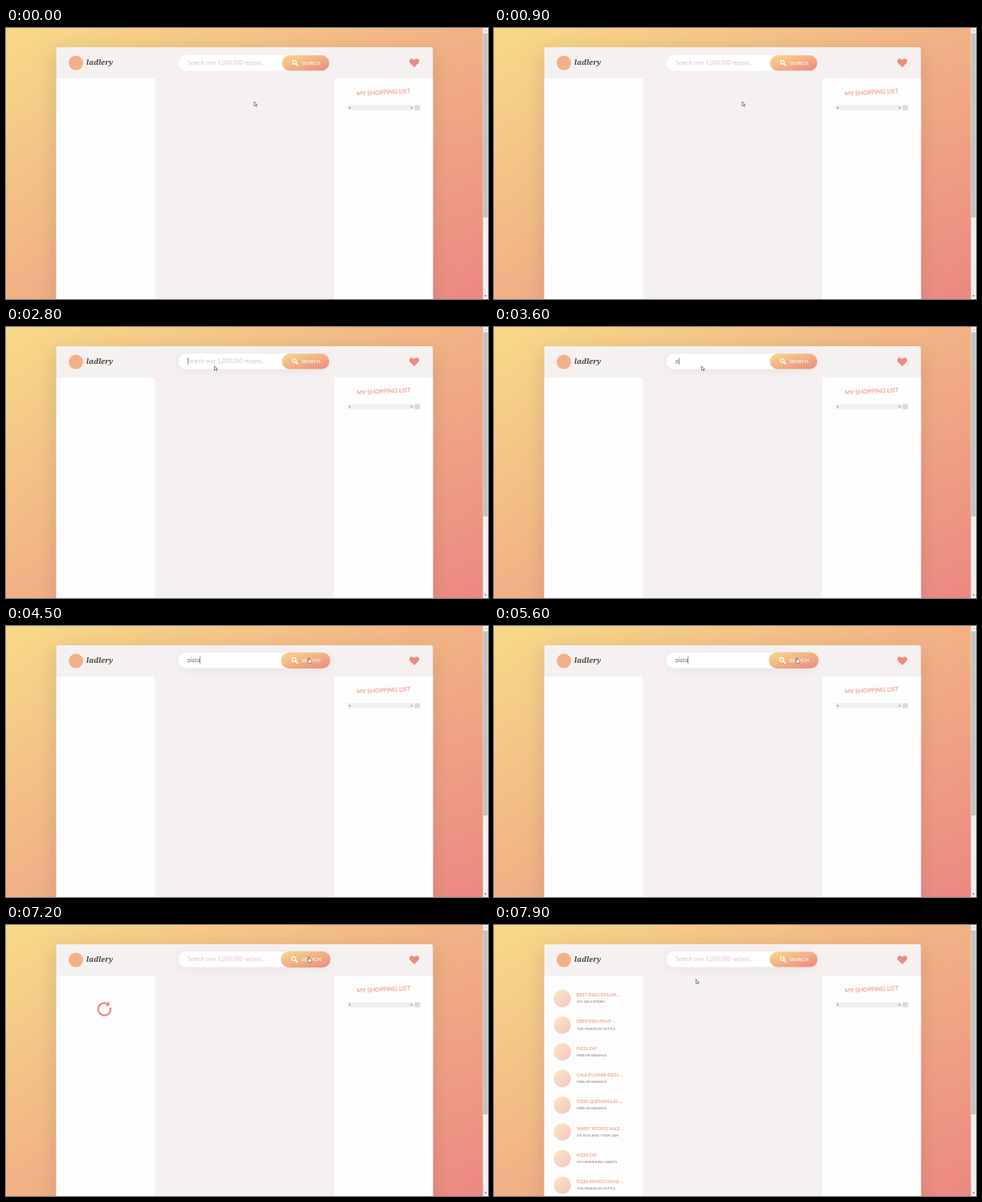
Recreate the animation shown at these times as an HTML page. Size 600x338 px, loop 8000 ms.

```html
<!DOCTYPE html>
<html lang="en">
<head>
<meta charset="utf-8">
<title>Recipe search</title>
<style>
  html, body { margin: 0; width: 100%; height: 100%; overflow: hidden; }
  svg { display: block; width: 600px; height: 338px; }
  text { font-family: Lato, "Open Sans", sans-serif; white-space: pre; }
  .brand { font: italic 700 9px "Noto Serif", serif; fill: #4a3f3c; }
  .hint { font-size: 6.93px; fill: #d0c6c3; }
  .typed { font-size: 6.93px; fill: #6b605c; }
  .label { font-size: 6px; font-weight: 500; fill: #fff; }
  .heading { font-size: 7.4px; font-weight: 500; fill: #ee8f80; }
  .title { font-size: 5.3px; font-weight: 500; fill: #ee8f80; }
  .author { font-size: 4.5px; fill: #877b77; }
</style>
</head>
<body>
<svg viewBox="0 0 600 338">
  <defs>
    <linearGradient id="warm" x1="0" y1="0" x2="1" y2="1">
      <stop offset="0" stop-color="#f7da88"/>
      <stop offset="1" stop-color="#ec8882"/>
    </linearGradient>
    <filter id="pageBlur"><feGaussianBlur stdDeviation="11.7"/></filter>
    <filter id="fieldBlur" y="-150%" height="400%"><feGaussianBlur stdDeviation="5.8"/></filter>
  </defs>

  <rect width="594" height="338" fill="url(#warm)"/>

  <!-- page scrollbar -->
  <rect x="593.7" width="6.3" height="338" fill="#f1f1f1"/>
  <rect x="594.2" y="6.6" width="5.3" height="229.6" fill="#c1c1c1"/>
  <path d="M595.5 4h2.8l-1.4-1.6z" fill="#a3a3a3"/>
  <path d="M595.5 333.6h2.8l-1.4 1.6z" fill="#505050"/>

  <!-- card -->
  <rect x="60.6" y="30" width="472.8" height="434" fill="#655a56" opacity=".2" filter="url(#pageBlur)"/>
  <rect x="62.6" y="24" width="468.8" height="430" rx="2.3" fill="#f5f1f0"/>
  <rect x="62.6" y="63" width="122.8" height="390" fill="#fefdfd"/>
  <rect x="408.6" y="63" width="122.8" height="390" fill="#fefdfd"/>

  <circle cx="87" cy="43.6" r="9" fill="#f2b088"/>
  <text class="brand" x="100" y="46.2">ladlery</text>
  <path d="M508.2 49.1L503 43.8C501 41.5 502.2 38.3 504.9 38.2C506.5 38.2 507.6 39.1 508.2 40.3C508.8 39.1 509.9 38.2 511.5 38.2C514.2 38.3 515.4 41.5 513.4 43.8Z" fill="#ee8b80"/>

  <!-- search form -->
  <g id="form">
    <rect id="glow" x="214.7" y="36.8" width="187.8" height="19.2" rx="9.6" fill="#655a56" filter="url(#fieldBlur)"/>
    <rect x="214.7" y="34.1" width="187.8" height="19.2" rx="9.6" fill="#fff"/>
    <text class="hint" id="hint" x="226" y="45.9">Search over 1,000,000 recipes...</text>
    <text class="typed" id="typed" x="226" y="45.9"></text>
    <rect id="caret" y="39.2" width=".7" height="8.6" fill="#6b605c"/>
    <g id="button">
      <rect x="343.5" y="34.1" width="59" height="19.2" rx="9.6" fill="url(#warm)"/>
      <g fill="none" stroke="#fff">
        <circle cx="359" cy="42.8" r="2.3" stroke-width="1.1"/>
        <path d="M360.8 44.6L363.2 47" stroke-width="1.5" stroke-linecap="round"/>
      </g>
      <text class="label" x="368" y="45.8">SEARCH</text>
    </g>
  </g>

  <!-- shopping list -->
  <g transform="translate(470 80) skewY(-3)">
    <text class="heading" y="2.8" text-anchor="middle">MY SHOPPING LIST</text>
  </g>
  <rect x="424.3" y="96.2" width="84.4" height="6.4" fill="#f0f0f0"/>
  <rect x="508.7" y="96.2" width="6.5" height="6.4" fill="#dadada"/>
  <path d="M428.5 98v2.8l-1.6-1.4zM504.4 98v2.8l1.6-1.4z" fill="#606060"/>

  <!-- results column -->
  <g id="loader">
    <path id="ring" fill="none" stroke="#ee8b80" stroke-width="2.1"/>
    <path d="M3.4 -.1H10.5L6.95 3.9Z" fill="#ee8b80"/>
  </g>
  <g id="results"></g>

  <path id="arrow" d="M0 0V5.3L1.3 4.2L2.2 6L3 5.6L2.2 3.9H3.8Z" fill="#fff" stroke="#3a3636" stroke-width=".6" stroke-linejoin="round"/>
  <path id="hand" d="M-.6 .5Q0 -.4 .6 .5V2.4L3.2 3Q3.9 3.3 3.8 4.2L3.2 6.8H-.1L-2 4.2Q-1.7 3.3 -.6 4.2Z" fill="#fff" stroke="#3a3636" stroke-width=".55" stroke-linejoin="round"/>
</svg>

<script>
  const LOOP = 8000;
  const FOCUS = 2450, ENTER = 4365, SUBMIT = 6050, LOADED = 7400, LEAVE = 7755;
  const FADE = 200;

  const $ = id => document.getElementById(id);
  const clamp = v => Math.min(1, Math.max(0, v));
  const smooth = v => v * v * (3 - 2 * v);
  const since = (t, start) => smooth(clamp((t - start) / FADE));
  const show = (el, on) => el.setAttribute('visibility', on ? 'visible' : 'hidden');
  const move = (el, value) => el.setAttribute('transform', value);

  // time, x, y of the pointer
  const pointer = [
    [0, 309, 92], [1250, 309, 92], [1600, 306.5, 89], [1900, 300, 81.2],
    [2500, 259.5, 48.7], [2900, 259.5, 48.7], [3300, 258.5, 48.7], [4150, 258.5, 48.7],
    [4480, 377, 39.6], [7680, 377, 39.6], [7900, 251.5, 67.7], [8000, 249.5, 68.5]
  ];
  const keys = [[3520, 'p'], [3780, 'pi'], [3950, 'piz'], [4100, 'pizz'], [4300, 'pizza'], [SUBMIT, '']];
  const recipes = [
    ['BEST PIZZA DOUGH ...', '205 SAUCEPANS'],
    ['DEEP DISH FRUIT ...', 'THE MEADOW KETTLE'],
    ['PIZZA DIP', 'PARLOR BAKINGS'],
    ['CAULIFLOWER PIZZA ...', 'PARLOR BAKINGS'],
    ['PIZZA QUESADILLAS ...', 'PARLOR BAKINGS'],
    ['SWEET POTATO KALE ...', 'SIX FIGS AND THEIR JAM'],
    ['PIZZA DIP', 'MY SIMMERING HABITS'],
    ['PIZZA POTATO SKINS ...', 'THE MEADOW KETTLE']
  ];

  $('results').innerHTML = recipes.map(([title, author], i) => `
    <g transform="translate(0 ${i * 33.27})">
      <circle cx="85" cy="91.6" r="10.8" fill="url(#warm)" opacity=".5"/>
      <text class="title" x="103" y="89.2">${title}</text>
      <text class="author" x="103" y="97.4">${author}</text>
    </g>`).join('');

  const polar = (r, deg) => {
    const a = deg * Math.PI / 180;
    return `${r * Math.cos(a)} ${r * Math.sin(a)}`;
  };
  $('ring').setAttribute('d', `M${polar(7.15, 50)}A7.15 7.15 0 1 1 ${polar(7.15, 359)}`);

  function pointerAt(t) {
    const i = Math.max(1, pointer.findIndex(p => p[0] > t));
    const [t0, x0, y0] = pointer[i - 1], [t1, x1, y1] = pointer[i];
    const u = smooth((t - t0) / (t1 - t0));
    return [x0 + (x1 - x0) * u, y0 + (y1 - y0) * u];
  }

  function caretOn(t) {
    if (t < FOCUS || t >= SUBMIT) return false;
    const start = t < 3520 ? FOCUS : t < 4430 ? t : 4430;
    return Math.floor((t - start) / 490) % 2 === 0;
  }

  function draw(t) {
    const focus = since(t, FOCUS);
    move($('form'), `translate(0 ${-0.78 * focus})`);
    $('glow').setAttribute('opacity', 0.08 * focus);

    const text = keys.reduce((last, [at, value]) => t >= at ? value : last, '');
    const typed = $('typed');
    if (typed.textContent !== text) typed.textContent = text;
    show($('hint'), !text);
    $('caret').setAttribute('x', 226 + (text ? typed.getComputedTextLength() : 0));
    show($('caret'), caretOn(t));

    const scale = 1 + 0.05 * (since(t, ENTER) - since(t, LEAVE));
    move($('button'), `translate(373 43.7) scale(${scale}) translate(-373 -43.7)`);

    show($('loader'), t >= SUBMIT && t < LOADED);
    move($('loader'), `translate(122.5 105) rotate(${295 + (t - 7200) * 0.24}) scale(1.075)`);
    show($('results'), t >= LOADED);

    const [x, y] = pointerAt(t);
    const over = t >= ENTER && t < LEAVE;
    for (const id of ['arrow', 'hand']) {
      move($(id), `translate(${x} ${y})`);
      show($(id), over === (id === 'hand'));
    }
  }

  const begin = performance.now();
  function tick() {
    draw((performance.now() - begin) % LOOP);
    requestAnimationFrame(tick);
  }
  tick();
</script>
</body>
</html>
```
